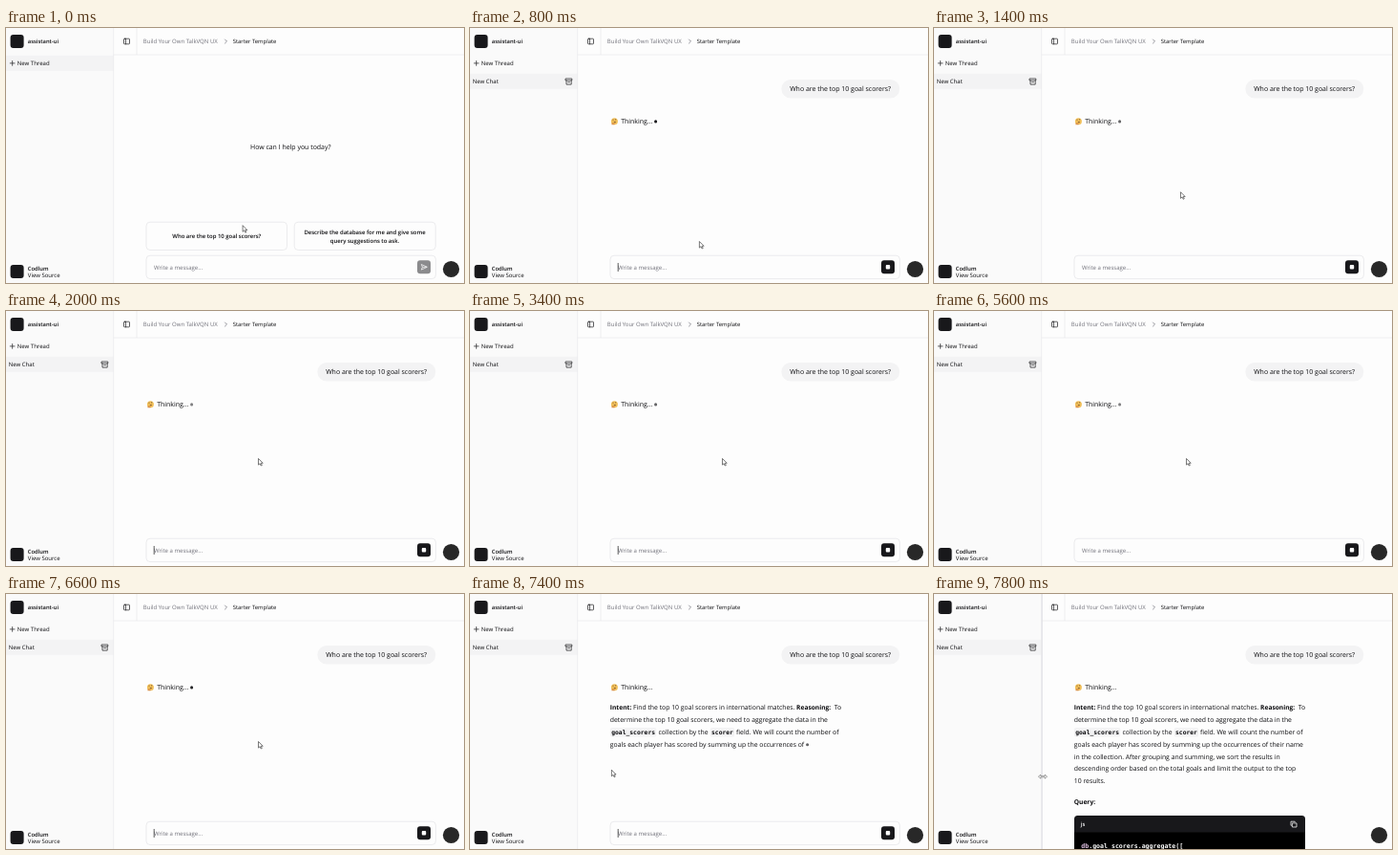
Write an HTML page that moves like this. It is 480 px wide and 267 px high and loops after 8000 ms.

```html
<!DOCTYPE html>
<html lang="en">
<head>
<meta charset="utf-8">
<title>Chat thread</title>
<style>
  html, body { margin: 0; width: 100%; height: 100%; overflow: hidden; background: #fdfdfd; }
  svg { display: block; width: 100%; height: 100%; }
  text { font: 6.03px "Open Sans", "Noto Sans", sans-serif; fill: #0c0c0f; text-rendering: geometricPrecision; white-space: pre; }
  .body { font-size: 6.96px; }
  .prose { font-size: 6.85px; }
  .strong { font-size: 6.65px; font-weight: 700; }
  .semi { font-size: 5.8px; font-weight: 600; }
  .prompt { font-size: 5.95px; font-weight: 600; }
  .muted { fill: #71717a; }
  .mid { text-anchor: middle; }
  .mono { font: bold 6.35px "DejaVu Sans Mono", monospace; }
  .code { font: bold 6.58px "DejaVu Sans Mono", monospace; fill: #fff; }
  .pink { fill: #e3c3e4; }
  .line { fill: none; stroke: #e4e4e7; stroke-width: .6; }
  .icon { fill: none; stroke: #27272a; stroke-width: .75; stroke-linecap: round; stroke-linejoin: round; }
  .card { fill: #fdfdfd; stroke: #e0e0e3; stroke-width: .6; }
  .dark { fill: #18181b; }
  .soft { fill: #f3f3f4; }
</style>
</head>
<body>
<svg viewBox="0 0 480 267" preserveAspectRatio="none">
  <rect width="480" height="267" fill="#fdfdfd"/>

  <!-- sidebar -->
  <rect width="112.5" height="267" fill="#fafafa"/>
  <rect id="row" class="soft" width="112.5" height="16"/>
  <path class="line" d="M112.7 0V267M112.7 28H480M137 0V28"/>
  <rect class="dark" x="4.6" y="7" width="14" height="14" rx="3"/>
  <text class="semi" x="22.8" y="16.2">assistant-ui</text>
  <path class="icon" d="M4.3 36.9H9M6.65 34.5V39.3"/>
  <text x="11.8" y="39.1">New Thread</text>
  <g class="chat">
    <text x="2.8" y="58.1">New Chat</text>
    <path class="icon" d="M100.4 53H106.8V54.9H100.4ZM101 54.9V59.1H106.2V54.9M102.8 56.7H104.4"/>
  </g>
  <rect class="dark" x="4.6" y="248" width="14" height="14" rx="3"/>
  <text class="semi" x="22.8" y="254.1">Codlum</text>
  <text x="22.8" y="261.3">View Source</text>

  <!-- header -->
  <path class="icon" d="M124.3 11.2H128.7Q129.5 11.2 129.5 12V16Q129.5 16.8 128.7 16.8H124.3Q123.5 16.8 123.5 16V12Q123.5 11.2 124.3 11.2ZM125.5 11.2V16.8"/>
  <text class="muted" x="143.8" y="16.2">Build Your Own TalkVQN UX</text>
  <path class="icon" style="stroke:#71717a" d="M229.5 12L231.5 14L229.5 16"/>
  <text x="237.8" y="16.2" style="font-size:5.87px">Starter Template</text>

  <g id="welcome">
    <text class="body mid" x="298.3" y="127">How can I help you today?</text>
    <rect class="card" x="147" y="203.2" width="147.5" height="29.3" rx="4"/>
    <rect class="card" x="302.2" y="203.2" width="148" height="29.3" rx="4"/>
    <g class="mid">
      <text class="prompt" x="220.8" y="220.2">Who are the top 10 goal scorers?</text>
      <text class="prompt" x="376" y="215.5">Describe the database for me and give some</text>
      <text class="prompt" x="376" y="224.8">query suggestions to ask.</text>
    </g>
  </g>

  <g class="chat">
    <rect class="soft" x="326.4" y="54" width="123.8" height="19.6" rx="9.8"/>
    <text class="body" x="335.2" y="66.4">Who are the top 10 goal scorers?</text>
    <circle cx="151.4" cy="97.7" r="3.5" fill="#f1c05a"/>
    <path d="M149.5 96.2h1M152 95.9h1.2M150.8 98.5h2" stroke="#6b4526" stroke-width=".8"/>
    <path d="M148.4 101.2l.5-2.4 1 .9 2.5-.3-1.2 1.9z" fill="#d98f48"/>
    <text class="body" x="158.2" y="100.2">Thinking...</text>
  </g>

  <g id="composer">
    <rect class="card" x="147" y="238.2" width="303.4" height="24.4" rx="4"/>
    <text class="muted" x="155" y="252.6">Write a message...</text>
    <path id="caret" d="M155.2 246V255" stroke="#18181b" stroke-width=".7"/>
    <rect id="button" x="431" y="243.2" width="14" height="14" rx="3"/>
    <path id="send" d="M435.3 247.5L441.4 250.3L435.3 253.1L436.4 250.3ZM436.4 250.3H441" fill="none" stroke="#fff" stroke-width=".7" stroke-linejoin="round"/>
    <rect id="stop" x="435.8" y="248" width="4.4" height="4.4" rx="1" fill="#fff"/>
  </g>

  <g id="codeBlock">
    <path class="dark" d="M147 267V235.5Q147 232 150.5 232H385.5Q389 232 389 235.5V267Z"/>
    <rect x="147" y="249.5" width="242" height="18"/>
    <text class="semi" x="153.8" y="243.2" style="fill:#fff">js</text>
    <path class="icon" style="stroke:#fff" d="M375.8 239.9H380V244H375.8ZM374.4 242.3H374V238.2H378.2V238.6"/>
  </g>

  <g id="answer"></g>
  <circle id="dot" r="1.55" class="dark"/>
  <circle cx="466.5" cy="252.5" r="8.6" fill="#282828"/>
  <path id="arrow" d="M0 0V6.6L1.6 5.2L2.7 7.5L3.8 7L2.7 4.8H4.7Z" fill="#fff" stroke="#222" stroke-width=".6"/>
  <g id="resize">
    <path d="M113.2 0V267" stroke="#dedee2"/>
    <path d="M109.4 191.2L111.8 189.2V190.6H116.2V189.2L118.6 191.2L116.2 193.2V191.8H111.8V193.2Z" fill="#fff" stroke="#444" stroke-width=".5"/>
  </g>
</svg>
<script>
const LOOP = 8000, TICK = 200, SUBMIT = 400, ANSWER = 6900;
const $ = id => document.getElementById(id);
const show = (el, on) => { el.style.display = on ? "" : "none"; };
const rowY = n => 121.3 + 12.83 * n;

// x, baseline, class, text
const segments = [
  [146.8, rowY(0), "strong", "Intent:"],
  [171, rowY(0), "prose", "Find the top 10 goal scorers in international matches."],
  [342.1, rowY(0), "strong", "Reasoning:"],
  [381.8, rowY(0), "prose", "To"],
  [146.8, rowY(1), "prose", "determine the top 10 goal scorers, we need to aggregate the data in the"],
  [148.2, rowY(2), "mono", "goal_scorers"],
  [197.6, rowY(2), "prose", "collection by the"],
  [253, rowY(2), "mono", "scorer"],
  [279, rowY(2), "prose", "field. We will count the number of"],
  [146.8, rowY(3), "prose", "goals each player has scored by summing up the occurrences of their name"],
  [146.8, rowY(4), "prose", "in the collection. After grouping and summing, we sort the results in"],
  [146.8, rowY(5), "prose", "descending order based on the total goals and limit the output to the top"],
  [146.8, rowY(6), "prose", "10 results."],
  [146.8, 219.6, "strong", "Query:"],
  [154.3, 266, "code pink", "db"],
  [162.2, 266, "code", ".goal_scorers.aggregate(["]
];

function svgNode(parent, name, attrs) {
  const node = document.createElementNS("http://www.w3.org/2000/svg", name);
  for (const key in attrs) node.setAttribute(key, attrs[key]);
  return parent.appendChild(node);
}

let total = 0;
const parts = segments.map(([x, y, cls, text]) => {
  const chip = cls === "mono" && svgNode($("answer"), "rect",
    { x: x - 1.2, y: y - 7, width: text.length * 3.82 + 2.4, height: 9.6, rx: 1.5, class: "soft" });
  const node = svgNode($("answer"), "text", { x, y, class: cls });
  const start = total;
  total += text.length;
  return { x, y, cls, text, node, chip, start };
});
const halfway = segments.map(s => s[3]).join("").indexOf(" their");
const codeStart = parts.find(p => p.cls.startsWith("code")).start;

// keys are [time, value, value...]
function track(keys, t) {
  const i = Math.max(1, keys.findIndex(k => k[0] >= t));
  const a = keys[i - 1], b = keys[i];
  const p = (t - a[0]) / (b[0] - a[0]);
  return a.slice(1).map((v, j) => v + (b[j + 1] - v) * p);
}
const pointer = [[0, 248.1, 206.7], [800, 240.4, 223.5], [1600, 264.5, 154.5],
  [6800, 264.5, 154.5], [7400, 148.4, 184.2], [7800, 114, 188], [LOOP, 114, 188]];
const typed = [[0, 0], [ANSWER, 0], [7400, halfway], [7800, total], [LOOP, total]];

function render(t) {
  const chatting = t >= SUBMIT;
  const count = Math.round(track(typed, t)[0]);
  const coding = count > codeStart;

  document.querySelectorAll(".chat").forEach(el => show(el, chatting));
  show($("welcome"), !chatting);
  $("row").setAttribute("y", chatting ? 47.8 : 28.8);

  show($("composer"), !coding);
  show($("codeBlock"), coding);
  $("button").setAttribute("fill", chatting ? "#18181b" : "#8b8b8d");
  show($("send"), !chatting);
  show($("stop"), chatting);
  show($("caret"), chatting && (t - 780 + 1060) % 1060 < 530);

  let dotX = 194.6, dotY = 97.9;
  for (const p of parts) {
    const visible = p.text.slice(0, Math.max(0, count - p.start));
    p.node.textContent = visible;
    if (p.chip) show(p.chip, visible);
    if (visible) {
      dotX = p.x + p.node.getComputedTextLength() + 3.4;
      dotY = p.y - 2.1;
    }
  }
  const dot = $("dot");
  show(dot, chatting && !coding);
  dot.setAttribute("cx", dotX);
  dot.setAttribute("cy", dotY);
  dot.setAttribute("opacity", 0.75 + 0.25 * Math.cos((t - 800) / 1000 * Math.PI));

  const resizing = t >= 7800;
  show($("arrow"), !resizing);
  show($("resize"), resizing);
  $("arrow").setAttribute("transform", `translate(${track(pointer, t)})`);
}

const began = performance.now();
function frame() {
  const t = (performance.now() - began) % LOOP;
  render(Math.floor(t / TICK) * TICK);
  requestAnimationFrame(frame);
}
frame();
</script>
</body>
</html>
```
